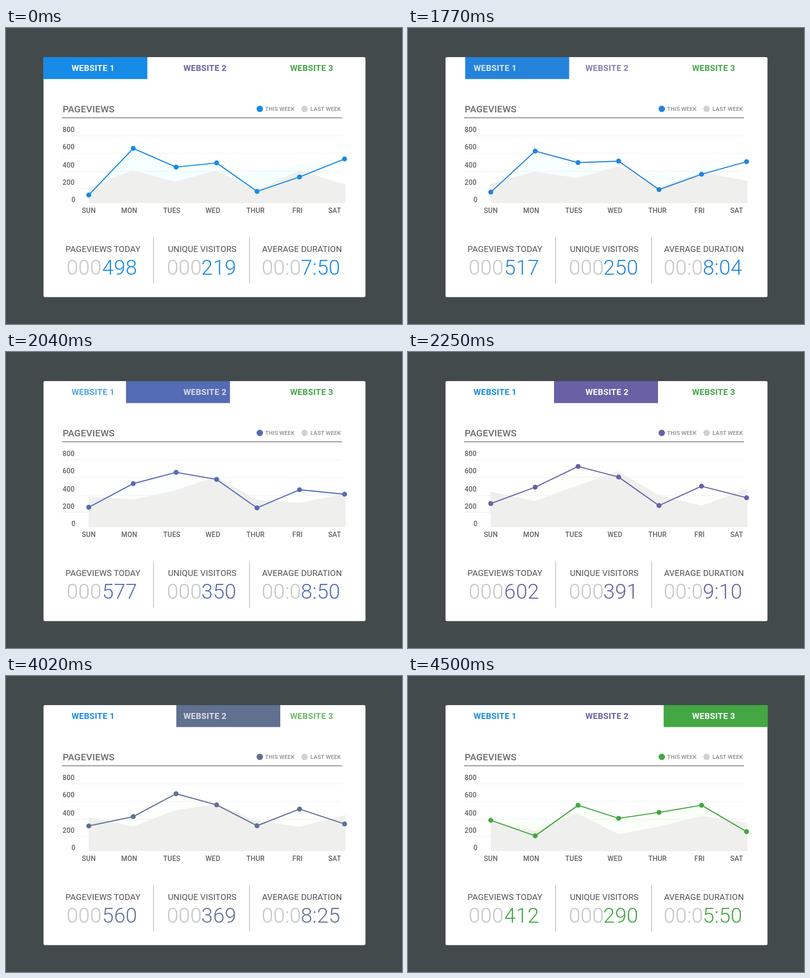
Write an HTML page that moves like this. It is 800 px wide and 600 px high and loops after 5.94 s.

```html
<!DOCTYPE html>
<html lang="en">
<head>
<meta charset="utf-8">
<title>Website pageviews</title>
<style>
  html, body { margin: 0; height: 100%; overflow: hidden; background: #434a4b; }
  svg { display: block; width: 100%; height: 100%; font-family: Roboto, sans-serif; }
  .mid { text-anchor: middle; }
  .end { text-anchor: end; }
  .tab { font-size: 17px; font-weight: 600; letter-spacing: .3px; }
  .title { font-size: 19px; font-weight: 450; fill: #6b6b6b; letter-spacing: .2px; }
  .key { font-size: 11.5px; font-weight: 500; fill: #8b8b8b; letter-spacing: .1px; }
  .axis { font-size: 14px; font-weight: 500; fill: #626262; letter-spacing: .2px; }
  .label { font-size: 17px; fill: #525252; letter-spacing: .15px; }
  .count { font-size: 42px; font-weight: 350; letter-spacing: .3px; }
  .zeros { font-weight: 300; fill: #c3c4c4; }
</style>
</head>
<body>
<svg id="stage" viewBox="0 0 800 600"></svg>
<script>
const LOOP = 5940, STEP = 30;
const BASE = 355;
const pointX = [167.2, 257, 343.6, 425.5, 507.1, 593, 684];
const areaX = [167, 256, 341, 425, 507, 593, 686];
const tabX = [176, 402, 617.5];
const sites = [
  { color: [22, 139, 231], tint: [245, 255, 255], tab: 75.5,
    week: [338.5, 244, 282, 273.5, 331.2, 302, 265.5],
    last: [323.5, 288.5, 311.5, 289, 329, 288.5, 317.5],
    views: 498, visitors: 219, seconds: 470 },
  { color: [104, 97, 165], tint: [254, 255, 253], tab: 295,
    week: [307.2, 274, 232, 253.5, 311.3, 272, 295.5],
    last: [283, 302, 271, 241.5, 290.5, 311.5, 277],
    views: 602, visitors: 391, seconds: 550 },
  { color: [67, 167, 67], tint: [249, 255, 247], tab: 516.5,
    week: [292.5, 324, 262, 288.5, 276.5, 262, 315.5],
    last: [296, 314, 278.5, 320.5, 305, 284, 297.5],
    views: 412, visitors: 290, seconds: 350 }
];
const moves = [{ start: 1590, length: 660 }, { start: 3810, length: 690 }];

const text = (cls, x, y, str, id = '') => `<text class="${cls}" x="${x}" y="${y}" id="${id}">${str}</text>`;
const line = (x1, y1, x2, y2, color, width) =>
  `<line x1="${x1}" y1="${y1}" x2="${x2}" y2="${y2}" stroke="${color}" stroke-width="${width}"/>`;

const stage = document.getElementById('stage');
stage.innerHTML = `
  <rect width="800" height="600" fill="#434a4b"/>
  <rect x="75.8" y="59" width="650.4" height="486.5" rx="3" fill="#fff"/>
  <rect id="tab" class="accent" y="59" width="210" height="44.5"/>
  ${tabX.map((x, i) => text('tab mid', x, 87, `WEBSITE ${i + 1}`, `name${i}`)).join('')}
  ${text('title', 114.5, 170.5, 'PAGEVIEWS')}
  <circle class="accent" cx="512.7" cy="164" r="6.5"/>
  <circle cx="603.2" cy="164" r="6.5" fill="#cdd2d2"/>
  ${text('key', 523.5, 168.2, 'THIS WEEK')}
  ${text('key', 615, 168.2, 'LAST WEEK')}
  ${line(113, 182, 679, 182, '#707273', 1.5)}
  <polygon id="tint"/>
  ${[218.5, 254, 290.5, 325].map(y => line(113, y, 679, y, '#eff3f4', 1.5)).join('')}
  <polygon id="last" fill="#efefee"/>
  <polyline id="week" fill="none" stroke-width="2.2" stroke-linejoin="round"/>
  ${pointX.map(x => `<circle class="accent dot" cx="${x}" r="5"/>`).join('')}
  ${[800, 600, 400, 200, 0].map((n, i) => text('axis end', n ? 138.7 : 140.3, [210.5, 246, 283, 318, 353.3][i], n)).join('')}
  ${['SUN', 'MON', 'TUES', 'WED', 'THUR', 'FRI', 'SAT'].map((day, i) =>
    text('axis mid', [167.3, 249, 335, 418, 504, 589, 664][i], 375.2, day)).join('')}
  ${line(298, 424.5, 298, 517.5, '#c4c7c8', 1.8)}
  ${line(492, 424.5, 492, 517.5, '#c4c7c8', 1.8)}
  ${text('label mid', 196, 454.3, 'PAGEVIEWS TODAY')}
  ${text('label mid', 396.5, 454.3, 'UNIQUE VISITORS')}
  ${text('label mid', 598, 454.3, 'AVERAGE DURATION')}
  ${text('count zeros', 122.5, 500, '000')}${text('count accent', 194.3, 500, '', 'views')}
  ${text('count zeros', 325, 500, '000')}${text('count accent', 394.6, 500, '', 'visitors')}
  ${text('count zeros', 516.5, 500, '00:0')}${text('count accent', 595.5, 500, '', 'seconds')}`;

const el = id => document.getElementById(id);
const accents = stage.querySelectorAll('.accent');
const dots = stage.querySelectorAll('.dot');
const mix = (a, b, p) => Array.isArray(a) ? a.map((v, i) => mix(v, b[i], p)) : a + (b - a) * p;
const rgb = c => `rgb(${c.map(Math.round)})`;
const join = (xs, ys) => xs.map((x, i) => `${x},${ys[i]}`).join(' ');
const clock = s => `${Math.floor(s / 60)}:${String(Math.floor(s) % 60).padStart(2, '0')}`;

function progress(t, { start, length }) {
  const p = Math.min(1, Math.max(0, (t - start) / length));
  return p * p * (3 - 2 * p);
}

function draw(t) {
  const second = t > moves[1].start ? 1 : 0;
  const p = progress(t, moves[second]);
  const from = sites[second], to = sites[second + 1];
  const now = key => mix(from[key], to[key], p);
  const color = rgb(now('color')), week = now('week');

  accents.forEach(node => node.setAttribute('fill', color));
  el('tab').setAttribute('x', now('tab'));
  sites.forEach((site, i) => {
    const active = i === second ? 1 - p : i === second + 1 ? p : 0;
    el(`name${i}`).setAttribute('fill', rgb(mix(site.color, [255, 255, 255], active)));
  });

  el('week').setAttribute('points', join(pointX, week));
  el('week').setAttribute('stroke', color);
  el('tint').setAttribute('points', join(pointX, week));
  el('tint').setAttribute('fill', rgb(now('tint')));
  el('last').setAttribute('points', `167,${BASE} ${join(areaX, now('last'))} 686,${BASE}`);
  dots.forEach((dot, i) => dot.setAttribute('cy', week[i]));

  el('views').textContent = Math.round(now('views'));
  el('visitors').textContent = Math.round(now('visitors'));
  el('seconds').textContent = clock(now('seconds'));
}

const began = performance.now();
function tick() {
  const t = (performance.now() - began) % LOOP;
  draw(Math.floor(t / STEP) * STEP);
  requestAnimationFrame(tick);
}
tick();
</script>
</body>
</html>
```
